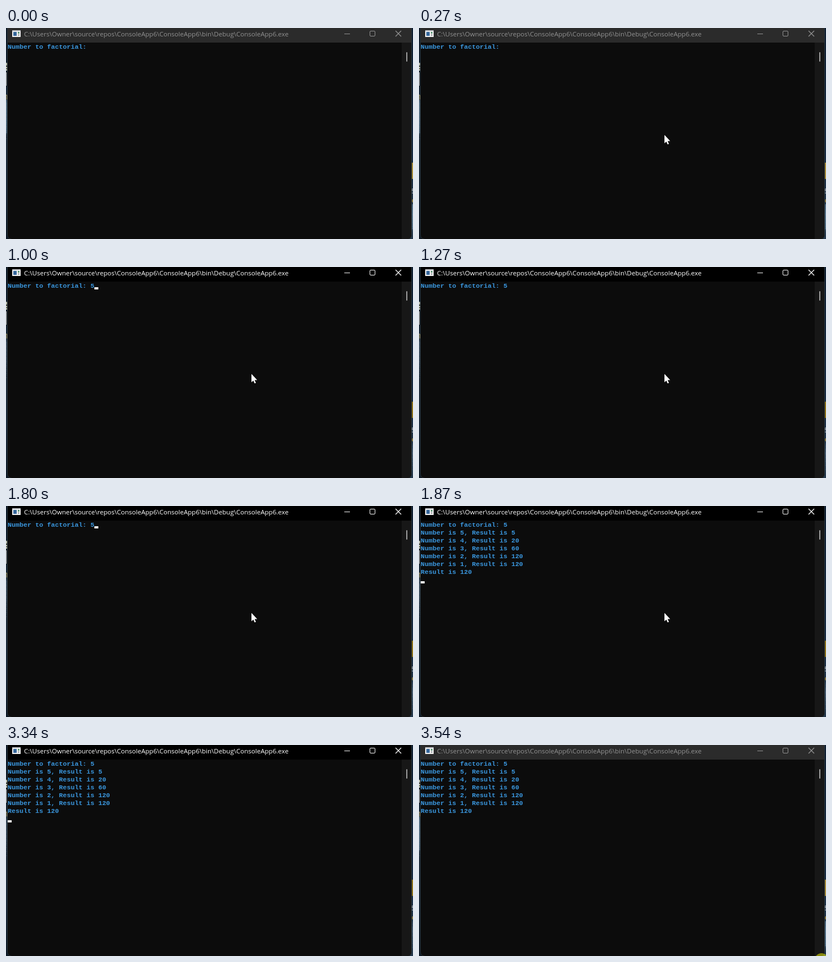
An HTML page for the animation above (3.69 s loop, 723 px wide and 376 px high).

```html
<!DOCTYPE html>
<html lang="en">
<head>
<meta charset="utf-8">
<title>Factorial console</title>
<style>
  html, body { margin: 0; width: 100%; height: 100%; overflow: hidden; background: #0c0c0c; }
  svg { display: block; width: 723px; height: 376px; }

  .title { font: 500 11.56px "Open Sans", "Noto Sans", sans-serif; fill: var(--ink); }
  .console { font: 700 11.667px "Liberation Mono", "DejaVu Sans Mono", monospace; fill: #3a96dd; white-space: pre; }
  .buttons { fill: none; stroke: var(--ink); }

  .window { animation: focus 3690ms step-end infinite; }
  .idle { animation: idle 3690ms step-end infinite; }
  .typed { animation: typed 3690ms step-end infinite; }
  .output { animation: output 3690ms step-end infinite; }
  .caret { animation: caret 3690ms step-end infinite; }
  .pointer { animation: pointer 3690ms step-end infinite; }
  .click { animation: click 3690ms step-end infinite; }

  @keyframes focus {
    0%, 95.934% { --bar: #2b2b2b; --ink: #929292; }
    20.053% { --bar: #000; --ink: #fff; }
  }
  @keyframes idle {
    0%, 95.934% { opacity: 1; }
    20.053% { opacity: 0; }
  }
  @keyframes typed {
    0% { visibility: hidden; }
    27.099%, 100% { visibility: visible; }
  }
  @keyframes output {
    0% { visibility: hidden; }
    50.677%, 100% { visibility: visible; }
  }
  @keyframes caret {
    0% { visibility: hidden; transform: translate(150px, 36px); }
    21.679% { visibility: visible; transform: translate(150px, 36px); }
    27.099% { visibility: visible; transform: translate(157px, 36px); }
    34.416% { visibility: hidden; transform: translate(157px, 36px); }
    48.779% { visibility: visible; transform: translate(157px, 36px); }
    50.677% { visibility: visible; transform: translate(3px, 134px); }
    77.777% { visibility: hidden; transform: translate(3px, 134px); }
    90.514% { visibility: visible; transform: translate(3px, 134px); }
    95.934%, 100% { visibility: hidden; transform: translate(3px, 134px); }
  }
  @keyframes pointer {
    0% { visibility: hidden; transform: translate(659px, 359px); }
    3.522% { visibility: visible; transform: translate(659px, 359px); }
    5.419% { visibility: visible; transform: translate(500px, 238px); }
    7.316% { visibility: visible; transform: translate(436px, 191px); }
    68.563% { visibility: visible; transform: translate(478px, 238px); }
    70.46% { visibility: visible; transform: translate(531px, 297px); }
    72.357%, 100% { visibility: hidden; transform: translate(531px, 297px); }
  }
  @keyframes click {
    0%, 21.679% { visibility: hidden; transform: translate(435px, 189px); }
    20.053% { visibility: visible; transform: translate(435px, 189px); }
    95.934%, 100% { visibility: visible; transform: translate(715px, 383px); }
  }
</style>
</head>
<body>
<svg viewBox="0 0 723 376">
  <defs>
    <linearGradient id="left" x2="0" y2="1">
      <stop offset="0" stop-color="#0c1826"/>
      <stop offset=".33" stop-color="#162636"/>
      <stop offset=".36" stop-color="#3c4c5c"/>
      <stop offset=".44" stop-color="#364656"/>
      <stop offset=".52" stop-color="#1f2c3a"/>
      <stop offset=".75" stop-color="#1b2a3b"/>
      <stop offset="1" stop-color="#0d1825"/>
    </linearGradient>
    <linearGradient id="right" x2="0" y2="1">
      <stop offset="0" stop-color="#0d1d31"/>
      <stop offset=".6" stop-color="#162a42"/>
      <stop offset=".82" stop-color="#20344a"/>
      <stop offset=".88" stop-color="#42566a"/>
      <stop offset="1" stop-color="#22364a"/>
    </linearGradient>
    <pattern id="grain" width="3" height="7" patternUnits="userSpaceOnUse">
      <path d="M0 1h2M1 4h2" stroke="#8194a4" stroke-opacity=".25"/>
    </pattern>
  </defs>

  <!-- desktop showing past the window edges -->
  <g>
    <rect width="4" height="376" fill="url(#left)"/>
    <rect x="718" width="5" height="376" fill="url(#right)"/>
    <path d="M0 128h4v72h-4zM718 313h5v50h-5z" fill="url(#grain)"/>
    <path class="idle" d="M0 128h4v60h-4zM718 314h5v45h-5z" fill="#7aa0b8" fill-opacity=".4"/>
    <path d="M0 62h3v14h-3z" fill="#b4b6a4"/>
    <path d="M0 67h2v2h-2zM0 72h2v1h-2z" fill="#25282a"/>
    <path d="M0 78h2v26h-2z" fill="#0d1117"/>
    <path d="M.5 79v24" stroke="#c8cbcb"/>
    <path d="M0 119.5h1.5v8" fill="none" stroke="#b5a064"/>
    <path d="M720 240h3v29h-3z" fill="#8d7016"/>
    <path class="idle" d="M720 240h3v29h-3z" fill="#a88b38"/>
    <path d="M723 287h-2v3h2m-2 4h2" fill="none" stroke="#d8d8d8"/>
    <path d="M723 306h-1v4h1" fill="none" stroke="#d4a734"/>
  </g>

  <g class="window">
    <path d="M2.5-1V368q0 8 8 8.5H712q8.500 0 8.500-8.500V-1z" fill="#0c0c0c" stroke="#26333b"/>
    <path d="M703 26h17v342q0 8-8 8h-9z" fill="#171717"/>
    <path d="M3 0h717v26h-717z" style="fill: var(--bar)"/>
    <rect x="711" y="43" width="2" height="17" rx="1" fill="#9f9f9f"/>

    <rect x="11" y="4" width="15" height="12" fill="#f3f3f3"/>
    <path d="M11 4h15v2h-15z" fill="#c9ccd0"/>
    <path d="M13 7h6v7h-6z" fill="#36679b"/>
    <path d="M21 7h3v3h-3z" fill="#5d9676"/>
    <path d="M21 11h3v3h-3z" fill="#a8acb0"/>

    <text class="title" x="32" y="15">C:\Users\Owner\source\repos\ConsoleApp6\ConsoleApp6\bin\Debug\ConsoleApp6.exe</text>
    <g class="buttons">
      <path d="M601 10.5h10"/>
      <path d="M692 5l10 10m0-10l-10 10" stroke-width="1.3"/>
      <rect x="646.5" y="5.5" width="9" height="9" rx="1.5"/>
    </g>
  </g>

  <g class="console">
    <text x="3" y="37">Number to factorial:</text>
    <text class="typed" x="150" y="37">5</text>
    <g class="output">
      <text x="3" y="51">Number is 5, Result is 5</text>
      <text x="3" y="65">Number is 4, Result is 20</text>
      <text x="3" y="79">Number is 3, Result is 60</text>
      <text x="3" y="93">Number is 2, Result is 120</text>
      <text x="3" y="107">Number is 1, Result is 120</text>
      <text x="3" y="121">Result is 120</text>
    </g>
  </g>

  <rect class="caret" width="7" height="4" fill="#fff"/>
  <path class="pointer" d="M0-.5V14.500L3.300 11.500L5.700 16.500L8 15.500L5.700 10.500H10.300Z" fill="#fff" stroke="#000" paint-order="stroke"/>
  <circle class="click" r="12" fill="#ff0" fill-opacity=".49"/>
</svg>
</body>
</html>
```
